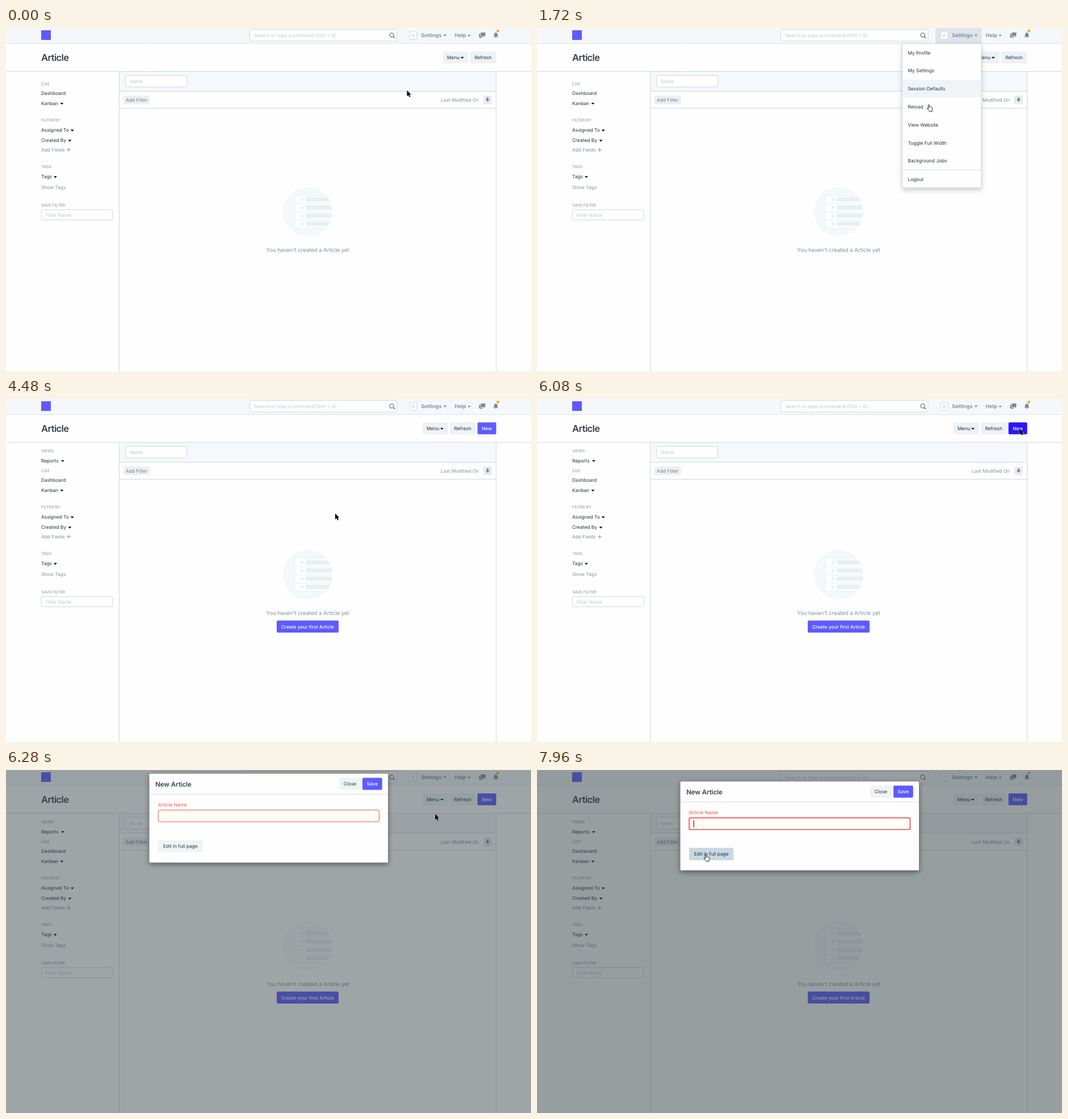
These frames come from a looping animation (925 px wide and 605 px high, 8000 ms). An HTML page:

```html
<!DOCTYPE html>
<html lang="en">
<head>
<meta charset="utf-8">
<title>Article list</title>
<style>
  html, body { margin: 0; width: 100%; height: 100%; overflow: hidden; background: #fefefe; }
  svg { display: block; width: 925px; height: 605px; }
  text { font: 8.36px Inter, "Open Sans", sans-serif; fill: #28313a; text-rendering: geometricPrecision; }
  .muted { fill: #8591a0; }
  .ghost { fill: #c0c8d0; }
  .head { font-size: 7px; fill: #8591a0; }
  .nav { font-size: 9.06px; font-weight: 600; fill: #7d8894; }
  .title { font-size: 16.5px; font-weight: 600; letter-spacing: -.6px; fill: #36414c; }
  .empty { font-size: 9.75px; letter-spacing: -.1px; fill: #8591a0; text-anchor: middle; }
  .modal-title { font-size: 11.5px; font-weight: 600; letter-spacing: -.1px; fill: #36414c; }
  .on { fill: #fff; font-weight: 500; }
  .mid { text-anchor: middle; }
  .line { stroke: #d1d8dd; fill: none; }
  .field { stroke: #d1d8dd; fill: #fefefe; }
  .btn { fill: #edf2f6; }
  .primary { fill: #5e5bff; }

  .bar, .chrome, .body, .list, .blankslate, .fresh, .side, .actions, .new, .menu, .hover,
  .shade, .modal, .ring, .caret, .edit, .cursor, .arrow, .hand { animation: 8s step-end infinite; }

  /* page reload, part by part */
  .bar { animation-name: bar; }
  .chrome { animation-name: chrome; }
  .body { animation-name: body; }
  .list { animation-name: list; }
  .blankslate { animation-name: blankslate; }
  @keyframes bar { 0%, 45.25% { opacity: 1 } 41.25% { opacity: 0 } }
  @keyframes chrome { 0%, 49.375% { opacity: 1 } 41.25% { opacity: 0 } }
  @keyframes body { 0%, 52% { opacity: 1 } 41.25% { opacity: 0 } }
  @keyframes list { 0%, 53% { opacity: 1 } 41.25% { opacity: 0 } }
  @keyframes blankslate {
    0% { opacity: 1; transform: none }
    41.25% { opacity: 0; transform: translateY(-14px) }
    56%, 100% { opacity: 1; transform: translateY(-14px) }
  }
  .fresh { animation-name: fresh; }
  .side { animation-name: side; }
  .actions { animation-name: actions; }
  @keyframes fresh { 0% { opacity: 0 } 41.25%, 100% { opacity: 1 } }
  @keyframes side { 0% { transform: none } 41.25%, 100% { transform: translateY(28px) } }
  @keyframes actions { 0% { transform: none } 41.25%, 100% { transform: translateX(-36px) } }

  .new { animation-name: press; }
  @keyframes press {
    0%, 78.5%, 100% { fill: #5e5bff }
    71% { fill: #3c38fb }
    73.125% { fill: #2b15ff }
    77.375% { fill: #4d43ff }
  }

  .menu { animation-name: menu; }
  .hover { animation-name: hover; }
  @keyframes menu { 0%, 25.75%, 100% { opacity: 0 } 13.75% { opacity: 1 } }
  @keyframes hover {
    0% { opacity: 0; transform: none }
    17% { opacity: 1; transform: none }
    20.125% { opacity: 1; transform: translateY(63.5px) }
    23%, 100% { opacity: 1; transform: translateY(95.25px) }
  }

  .shade { animation-name: shade; }
  .modal { animation-name: modal; }
  .modal .panel { filter: drop-shadow(0 3px 5px rgba(0, 0, 0, .45)); }
  @keyframes shade { 0% { opacity: 0 } 77.375% { opacity: .19 } 78.5% { opacity: .47 } 79.875%, 100% { opacity: .5 } }
  @keyframes modal {
    0% { opacity: 0; transform: translateY(-28px) }
    77.375% { opacity: .47; transform: translateY(-27.5px) }
    78.5% { opacity: 1; transform: translateY(-13.7px) }
    79.875%, 100% { opacity: 1; transform: none }
  }
  .ring { stroke: #fb4a48; fill: #fffdf5; animation-name: ring; }
  .caret { animation-name: caret; }
  .edit { animation-name: edit; }
  @keyframes ring { 0% { stroke-width: 1 } 81.75%, 100% { stroke-width: 1.7 } }
  @keyframes caret { 0%, 88.75% { opacity: 0 } 83.6%, 95%, 100% { opacity: 1 } }
  @keyframes edit { 0% { fill: #f0f4f7 } 92% { fill: #d6e1e9 } 93.5%, 100% { fill: #c8d7e2 } }

  .cursor { animation-name: move; }
  .arrow { animation-name: arrow; }
  .hand { animation-name: hand; }
  @keyframes move {
    0% { transform: translate(706.5px, 110px) }
    2.875% { transform: translate(706.5px, 110px); animation-timing-function: steps(4, start) }
    7% { transform: translate(615px, 194px); animation-timing-function: steps(4, start) }
    12.25% { transform: translate(743px, 20px) }
    15.25% { transform: translate(743px, 20px); animation-timing-function: steps(3, start) }
    18.25% { transform: translate(722px, 50px) }
    20.125% { transform: translate(703px, 105px) }
    21.5% { transform: translate(690px, 135px) }
    24.4% { transform: translate(690px, 135px); animation-timing-function: steps(4, start) }
    29.6% { transform: translate(580px, 202px) }
    62% { transform: translate(580px, 202px); animation-timing-function: steps(3, start) }
    65% { transform: translate(506px, 343px); animation-timing-function: steps(6, start) }
    72% { transform: translate(850px, 52px) }
    78.5% { transform: translate(756px, 77.5px) }
    79.875% { transform: translate(625px, 112px) }
    81.75% { transform: translate(547px, 128px) }
    83.625% { transform: translate(547px, 128px); animation-timing-function: steps(7, start) }
    93.5%, 100% { transform: translate(297px, 149px) }
  }
  @keyframes arrow { 0%, 25.75% { opacity: 1 } 11%, 92%, 100% { opacity: 0 } }
  @keyframes hand { 0%, 25.75% { opacity: 0 } 11%, 92%, 100% { opacity: 1 } }
</style>
</head>
<body>
<svg viewBox="0 0 925 605" xmlns="http://www.w3.org/2000/svg">
  <defs>
    <path id="tri" d="M0 0h5.8l-2.9 3.1z"/>
    <clipPath id="disc"><circle cx="531.5" cy="324" r="43.5"/></clipPath>
    <g id="row">
      <rect x="508.5" y="295.5" width="80" height="14.4" fill="#fdfefe" stroke="#e9eff3"/>
      <circle cx="521.5" cy="302.2" r="2.6" fill="#e9eff3"/>
      <rect x="528" y="298.2" width="60" height="8" fill="#e9f0f4"/>
    </g>
  </defs>

  <rect width="925" height="605" fill="#fefefe"/>

  <g class="chrome">
    <rect width="925" height="27" fill="#f5f7fb"/>
    <path class="line" d="M0 27.5H925" stroke-opacity=".7"/>
    <path class="line" d="M0 76.5H925"/>
  </g>

  <g class="bar">
    <rect x="62" y="4" width="17" height="17" fill="#5e5bff"/>
    <rect class="field" x="429.5" y="2.5" width="259.5" height="20.5" rx="2.5"/>
    <text class="ghost" x="437" y="16">Search or type a command (Ctrl + G)</text>
    <g fill="none" stroke="#4c5661" stroke-width="1.1">
      <circle cx="679.6" cy="12.4" r="3.6"/><path d="M682.2 15l3 3"/>
    </g>
    <g fill="#7d8894">
      <path d="M836.5 8h8v6h-1v2l-2-2h-5z"/>
      <path d="M833.5 10.2h2.2v4.6h4.6v1.8h-3l-2 1.8v-1.8h-1.8z"/>
      <path d="M863 8.2q3 .2 3 4 0 2.3 1.4 3.4h-8.8q1.4-1.1 1.4-3.4 0-3.8 3-4zM861.7 16.2h2.6q-.3 1.2-1.3 1.2t-1.3-1.2z"/>
    </g>
  </g>
  <circle class="body" cx="866.6" cy="5.2" r="2.3" fill="#ffa00a"/>

  <g class="body">
    <text class="title" x="62" y="58">Article</text>
    <g class="actions">
      <rect class="btn" x="769.7" y="41.3" width="45" height="21" rx="2"/>
      <text x="777" y="55">Menu</text><use href="#tri" x="801" y="51"/>
      <rect class="btn" x="818" y="41.3" width="45.5" height="21" rx="2"/>
      <text class="mid" x="840.7" y="55">Refresh</text>
    </g>
    <g class="fresh">
      <rect class="new" x="830.7" y="41.3" width="33" height="21" rx="2"/>
      <text class="on mid" x="847.2" y="55">New</text>
      <text class="head" x="62" y="94.2">VIEWS</text>
      <text x="62" y="111.7">Reports</text><use href="#tri" x="97" y="108"/>
    </g>
    <g class="side">
      <text class="muted" x="62" y="100.7">List</text>
      <text x="62" y="117.7">Dashboard</text>
      <text x="62" y="135.7">Kanban</text><use href="#tri" x="95.5" y="132"/>
      <text class="head" x="62" y="164.9">FILTER BY</text>
      <text x="62" y="183">Assigned To</text><use href="#tri" x="113.8" y="179.3"/>
      <text x="62" y="201">Created By</text><use href="#tri" x="109.5" y="197.3"/>
      <text class="muted" x="62" y="217.7">Add Fields</text>
      <path d="M107 214.8h7M110.5 211.3v7" stroke="#8591a0"/>
      <text class="head" x="62" y="246.7">TAGS</text>
      <text x="62" y="265">Tags</text><use href="#tri" x="84" y="261.3"/>
      <text class="muted" x="62" y="283.7">Show Tags</text>
      <text class="head" x="62" y="314.6">SAVE FILTER</text>
      <rect class="field" x="62.2" y="320.5" width="126" height="18" rx="2.5"/>
      <text class="ghost" x="69.5" y="332.7">Filter Name</text>
    </g>
    <path class="line" d="M199.5 77V605M863.5 77V605"/>
  </g>

  <g class="list">
    <rect x="200" y="77" width="663" height="34" fill="#f5f8fc"/>
    <path class="line" d="M200 111.5H863M200 141.5H863"/>
    <rect class="field" x="210.5" y="83.5" width="108" height="20.5" rx="2"/>
    <text class="ghost" x="218" y="97">Name</text>
    <rect x="207" y="119" width="46.7" height="15.3" rx="2" fill="#ebf0f3"/>
    <text x="211" y="130" style="fill:#75818e">Add Filter</text>
    <text class="muted" x="766" y="130">Last Modified On</text>
    <rect x="841" y="119" width="15" height="15.3" rx="2" fill="#e6ecf0"/>
    <path d="M847 122.6h3v3.4h2.2l-3.7 4.2-3.7-4.2h2.2z" fill="#7d8894"/>
  </g>

  <g class="blankslate">
    <circle cx="531.5" cy="324" r="43.5" fill="#f4f8fb"/>
    <g clip-path="url(#disc)">
      <use href="#row"/><use href="#row" y="14.4"/><use href="#row" y="28.8"/><use href="#row" y="43.2"/>
    </g>
    <text class="empty" x="531.5" y="394.8">You haven't created a Article yet</text>
    <g class="fresh">
      <rect class="primary" x="477" y="404.7" width="109" height="21.3" rx="2"/>
      <text class="on mid" x="531.5" y="418.5">Create your first Article</text>
    </g>
  </g>

  <g class="menu">
    <rect x="702" width="81.5" height="27" fill="#dfe3eb"/>
    <path d="M643.5 27.5h139.5v252q0 2.5-2.5 2.5h-134.5q-2.5 0-2.5-2.5z" fill="#fefefe" stroke="#cdd4da" style="filter:drop-shadow(0 4px 4px rgba(0,0,0,.18))"/>
    <rect class="hover" x="644" y="28" width="138.5" height="31.5" fill="#f0f4f7"/>
    <path class="line" d="M644 250.3h138.5"/>
    <g transform="translate(653.5 46.6)">
      <text>My Profile</text>
      <text y="31.8">My Settings</text>
      <text y="63.6">Session Defaults</text>
      <text y="95.3">Reload</text>
      <text y="127">View Website</text>
      <text y="159">Toggle Full Width</text>
      <text y="190.7">Background Jobs</text>
      <text y="223">Logout</text>
    </g>
  </g>
  <g class="bar">
    <rect x="711" y="6" width="13" height="14" rx="2.5" fill="#fcfdfe" stroke="#d1d8dd"/>
    <text class="mid" x="717.5" y="16.1" style="fill:#b9c3cd">A</text>
    <text class="nav" x="731.3" y="16.2">Settings</text>
    <text class="nav" x="790.5" y="16.2">Help</text>
    <g fill="#7d8894"><use href="#tri" x="770.5" y="11.6"/><use href="#tri" x="813.2" y="12"/></g>
  </g>

  <rect class="shade" width="925" height="605" fill="#334143"/>
  <g class="modal">
    <rect class="panel" x="252.5" y="20.3" width="420.5" height="156.7" rx="2" fill="#fefefe"/>
    <path class="line" d="M253 56.3h420" stroke-opacity=".8"/>
    <text class="modal-title" x="263.2" y="43.3">New Article</text>
    <rect x="587" y="27.4" width="38" height="21.4" rx="2" fill="#eff3f6"/>
    <text class="mid" x="606" y="41.2">Close</text>
    <rect class="primary" x="628" y="27.4" width="34.7" height="21.4" rx="2"/>
    <text class="on mid" x="645.3" y="41.2">Save</text>
    <text x="268" y="77.7" style="fill:#fb4a48">Article Name</text>
    <rect class="ring" x="268.2" y="84.3" width="389.3" height="20.7" rx="2.5"/>
    <rect class="caret" x="275.6" y="88.6" width="1.1" height="12.4" fill="#111"/>
    <rect class="edit" x="268" y="137.2" width="78.3" height="22" rx="2"/>
    <text class="mid" x="307.2" y="151.3">Edit in full page</text>
  </g>

  <g class="cursor">
    <path class="arrow" d="M0 0V10.4L2.4 8.2 4.1 12 5.9 11.2 4.3 7.5H7.5Z" fill="#000" stroke="#fff" stroke-width=".8" paint-order="stroke"/>
    <path class="hand" transform="translate(-3.4 -.5)" fill="#fff" stroke="#111" stroke-width="1" stroke-linejoin="round"
      d="M3.4 7.6L2.7 1.8Q2.7.5 3.6.5 4.4.6 4.6 1.7L5.1 4.6Q6.2 3.9 6.8 5 7.9 4.4 8.4 5.5 9.6 5.1 9.9 6.4L10.2 8.6Q10.1 10.2 9.3 11.2V12.7H4.7L4.4 11.6Q2.8 10.3.8 7.6.2 6.6 1.1 6.4 2 6.4 3.4 7.6Z"/>
  </g>
</svg>
</body>
</html>
```
